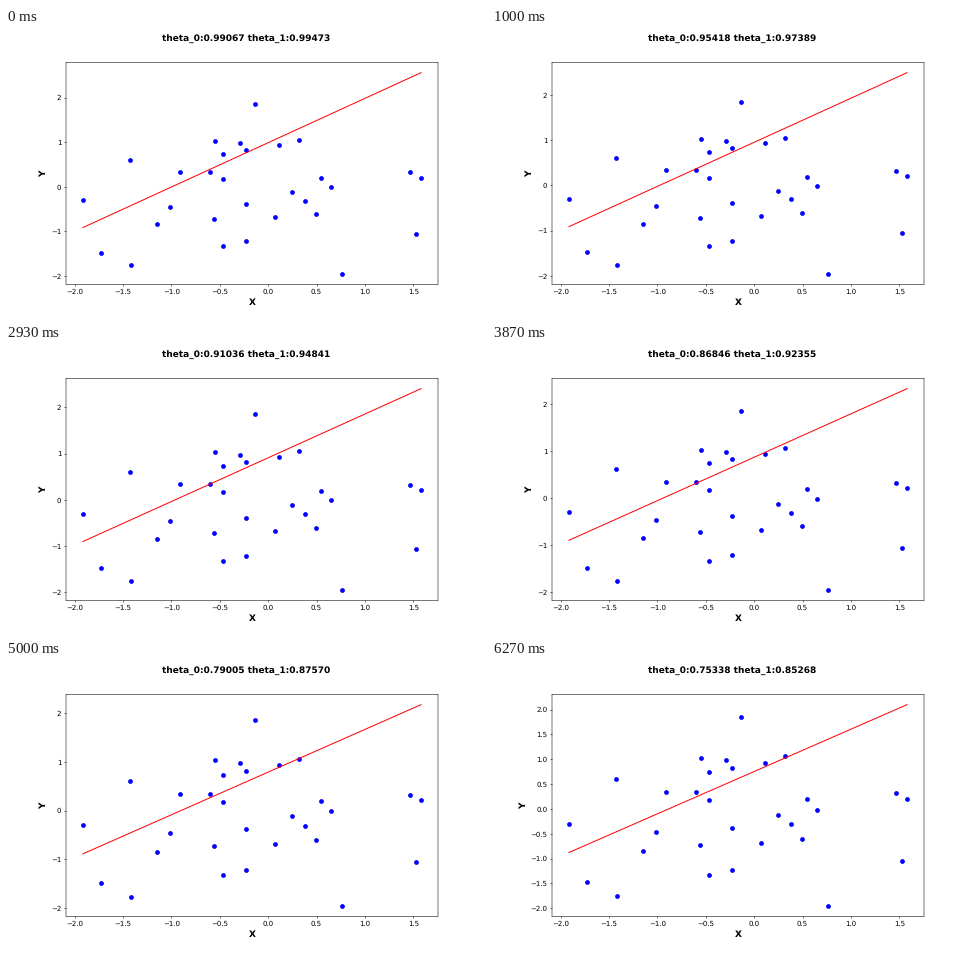
A matplotlib script that plays this animation: 480 by 288 pixels, repeating every 6990 ms.

```python
import numpy as np
import matplotlib.pyplot as plt
from matplotlib.animation import FuncAnimation

# Soft sub-pixel edges and unhinted glyphs.
plt.rcParams.update({
    "font.family": "DejaVu Sans",
    "path.snap": False,
    "text.hinting": "none",
    "text.hinting_factor": 1,
})

LOOP_MS = 6990
INTERVAL = 30
STEP_MS = 1000
RATE = 0.01
SHOWN_UPDATES = [1, 5, 10, 15, 20, 25, 30]

np.random.seed(42)
x = np.random.randn(30)
y = np.random.randn(30)
ends = np.array([x.min(), x.max()])


def descend(updates):
    """Run gradient descent for a straight line, starting from (1, 1)."""
    theta = np.ones(2)
    for _ in range(updates):
        error = theta[0] + theta[1] * x - y
        theta = theta - RATE * np.array([error.mean(), (error * x).mean()])
    return theta


thetas = [descend(n) for n in SHOWN_UPDATES]

fig, ax = plt.subplots(figsize=(10, 6), dpi=48)
bold = dict(fontsize=14, fontweight="bold")
title = fig.suptitle("", **bold)
ax.set_xlabel("X", **bold)
ax.set_ylabel("Y", **bold)
ax.scatter(x, y, color="b")
line, = ax.plot(ends, ends, "r-", linewidth=1.5)


def update(frame):
    # Switch on the tick nearest to each whole second.
    index = min((frame * INTERVAL + 20) // STEP_MS, len(thetas) - 1)
    t0, t1 = thetas[index]
    fit = t0 + t1 * ends
    line.set_ydata(fit)
    low, high = min(y.min(), fit.min()), max(y.max(), fit.max())
    pad = 0.05 * (high - low)
    ax.set_ylim(low - pad, high + pad)
    title.set_text(f"theta_0:{t0:.5f} theta_1:{t1:.5f}")
    return line, title


anim = FuncAnimation(fig, update, frames=LOOP_MS // INTERVAL,
                     interval=INTERVAL, repeat=True, repeat_delay=0)
plt.show()
```
